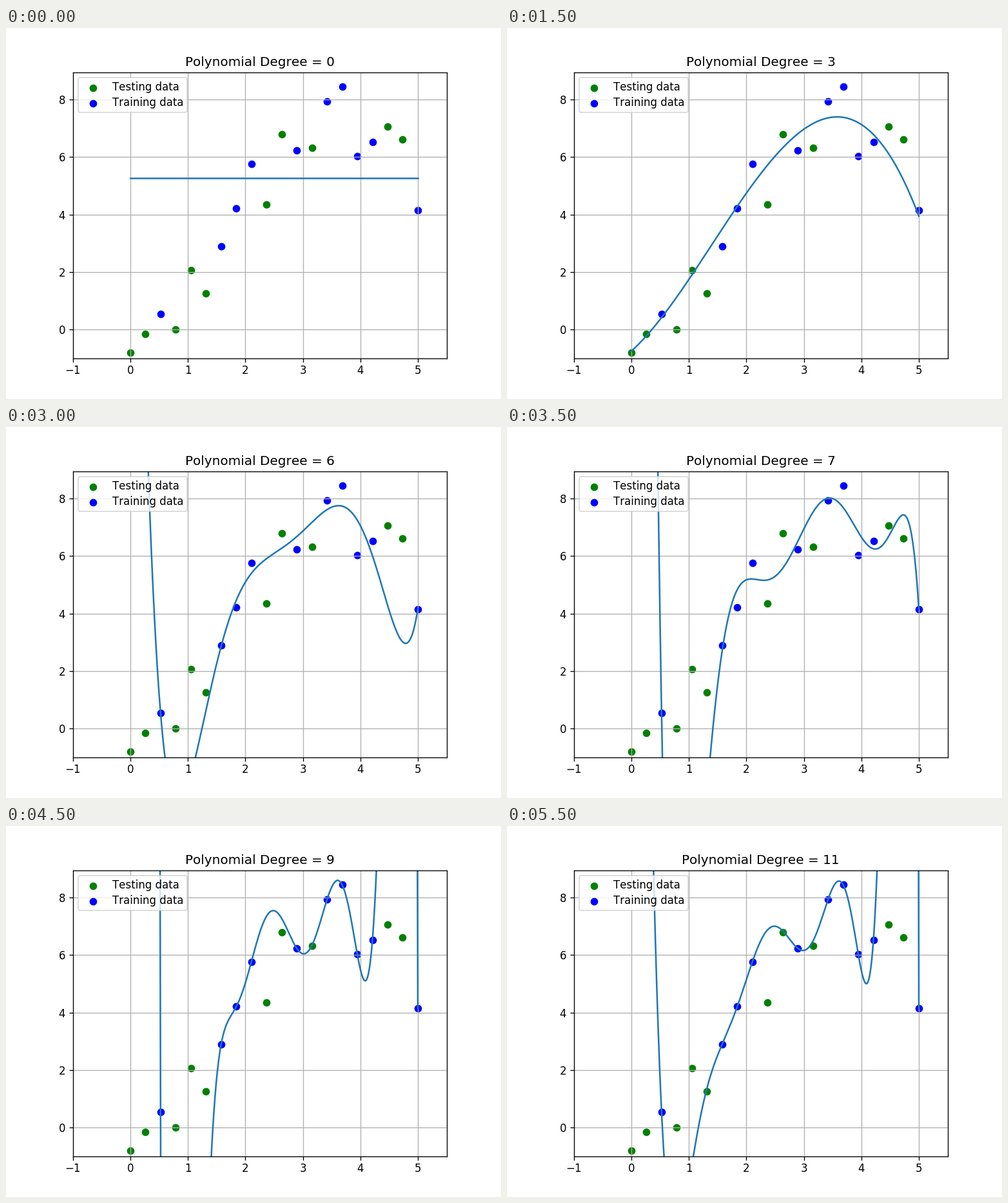
Recreate the animation shown at these times as a matplotlib script. Size 768 by 576 pixels, loop 6 s.

```python
import numpy as np
import matplotlib.pyplot as plt
from matplotlib.animation import FuncAnimation

plt.rcParams["font.family"] = "DejaVu Sans"
plt.rcParams["text.kerning_factor"] = 6

MAX_DEGREE = 11
STEP_MS = 500

# Sample number -> measured value; the remaining samples are for testing.
TRAINING = {2: 0.54, 6: 2.89, 7: 4.205, 8: 5.765, 11: 6.235,
            13: 7.933, 14: 8.442, 15: 6.024, 16: 6.524, 19: 4.15}

x = np.linspace(0, 5, 20)
train = np.array(list(TRAINING))
train_y = np.array(list(TRAINING.values()))
test = np.setdiff1d(np.arange(len(x)), train)
grid_x = np.linspace(0, 5, 1000)


def powers(values, degree):
    return np.vander(values, degree + 1, increasing=True)


def fit(degree, at):
    """Least-squares polynomial; minimum norm once it is underdetermined."""
    coefs = np.linalg.lstsq(powers(x[train], degree), train_y, rcond=None)[0]
    return powers(at, degree) @ coefs


def test_values(i):
    """Cubic trend with a slow drift and a three-sample ripple."""
    drift = 0.022 * (i - 6.4) ** 2 - 0.95
    ripple = 1.15 * np.tanh(i / 3) * np.cos(2 * np.pi * (i - 1) / 3)
    return fit(3, x[i]) + drift + ripple


curves = [fit(degree, grid_x) for degree in range(MAX_DEGREE + 1)]

fig, ax = plt.subplots(figsize=(6.4, 4.8), dpi=120)
ax.scatter(x[test], test_values(test), color="green", label="Testing data")
ax.scatter(x[train], train_y, color="blue", label="Training data")
line, = ax.plot(grid_x, curves[0], color="#1f77b4")
ax.set_xlim(-1, 5.5)
ax.set_ylim(-1, train_y.max() + 0.5)
ax.set_aspect(0.5)
ax.grid(True)
ax.tick_params(axis="x", pad=3)
ax.legend(loc="upper left", labelspacing=0.38, borderpad=0.34,
          handlelength=2.12, handletextpad=0.74)
title = ax.set_title("")


def update(degree):
    line.set_ydata(curves[degree])
    title.set_text(f"Polynomial Degree = {degree}")
    return line, title


anim = FuncAnimation(fig, update, frames=MAX_DEGREE + 1, interval=STEP_MS,
                     repeat=True)
plt.show()
```
